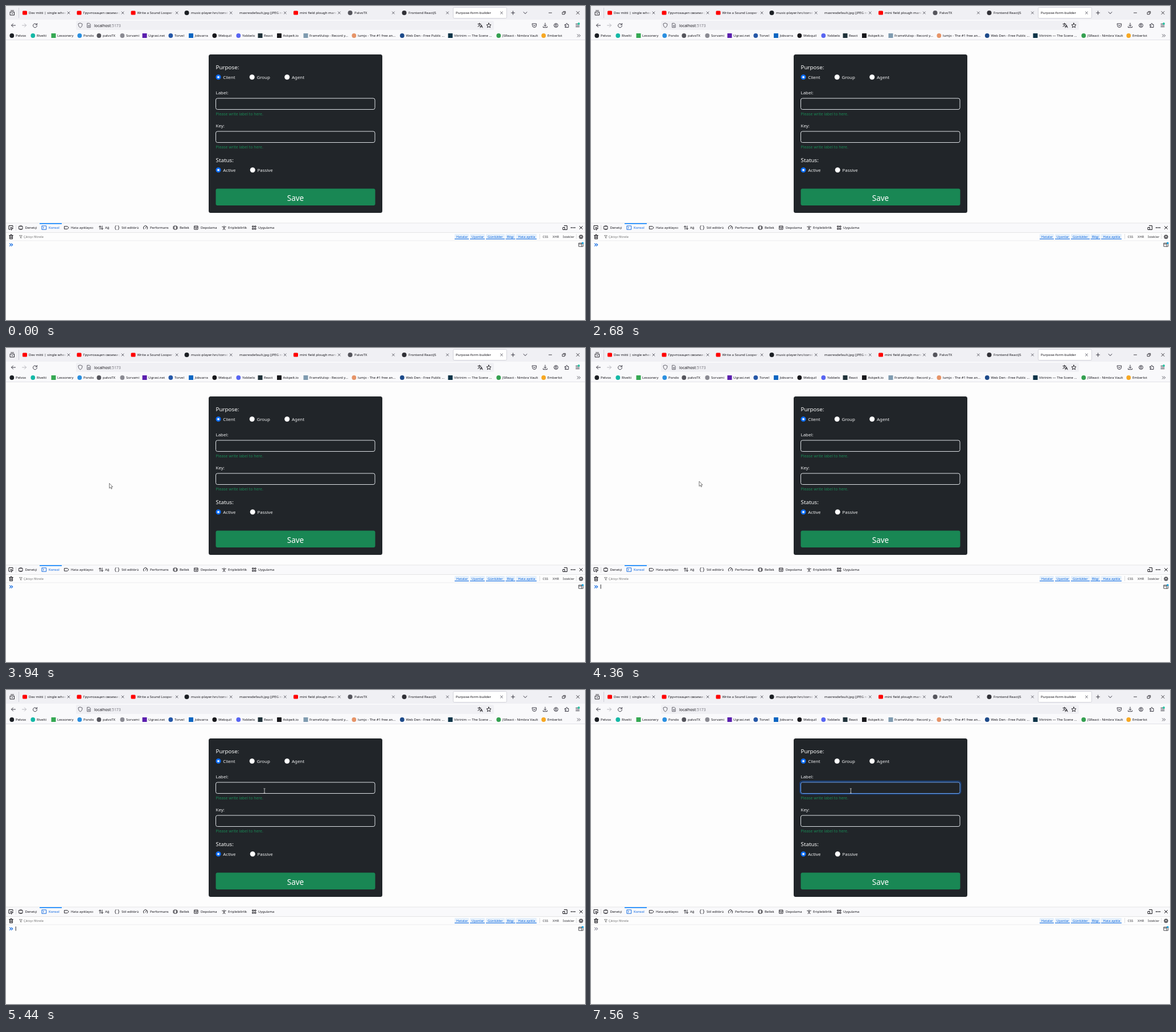
Animation, 1017 px wide and 551 px high, one loop 8 s. Source, as an HTML page:

```html
<!DOCTYPE html>
<html lang="en">
<head>
<meta charset="utf-8">
<title>Purpose-form-builder</title>
<style>
  html, body { margin: 0; width: 100%; height: 100%; overflow: hidden; background: #fdfdfd; }
  svg { display: block; width: 1017px; height: 551px; font-family: "Noto Sans", "Open Sans", sans-serif; }
  text { white-space: pre; }
</style>
</head>
<body>
<svg id="stage" viewBox="0 0 1017 551"></svg>
<script>
const INK = '#15141a', BLUE = '#0060df', CARD = '#212529';
const LOOP = 8000;

const text = (x, y, str, size = 6, fill = INK, extra = '') =>
  `<text x="${x}" y="${y}" font-size="${size}" fill="${fill}" ${extra}>${str}</text>`;
const rect = (x, y, w, h, fill, r = 0, extra = '') =>
  `<rect x="${x}" y="${y}" width="${w}" height="${h}" rx="${r}" fill="${fill}" ${extra}/>`;
const circle = (x, y, r, fill, extra = '') =>
  `<circle cx="${x}" cy="${y}" r="${r}" fill="${fill}" ${extra}/>`;
// Line icon, drawn around its centre
const icon = (x, y, d, color = '#3a3944', width = 1) =>
  `<path transform="translate(${x} ${y})" d="${d}" fill="none" stroke="${color}" stroke-width="${width}" stroke-linecap="round" stroke-linejoin="round"/>`;

const CROSS = 'M-2-2L2 2M2-2L-2 2';
const BOX = 'M-3-3H3V3H-3Z';
const RING = 'M-3.5 0A3.5 3.5 0 1 1 3.5 0A3.5 3.5 0 1 1-3.5 0';
const CHEVRONS = 'M-2.5-2.2L-.3 0L-2.5 2.2M.5-2.2L2.7 0L.5 2.2';

function tabBar() {
  const tabs = [
    [40, 'Dev mitti | single wheel p', '#f00'],
    [135.5, 'Грунтозацеп своими р', '#f00'],
    [230.5, 'Write a Sound Looper ap', '#f00'],
    [325, 'music-player/src/const', '#1b1f24'],
    [410, 'maxresdefault.jpg (JPEG re'],
    [516, 'mini field plough manuf', '#f00'],
    [612, 'PalvoTX', '#55555c'],
    [707, 'Frontend ReactJS', '#303036'],
    [790, 'Purpose-form-builder']
  ];
  let out = rect(0, 0, 1017, 24, '#f0f0f4') + rect(22, 3, 1, 18, '#cfcfd8');
  out += rect(785.5, 2.5, 94, 19, '#fff', 2, 'stroke="#c9c9d2" stroke-width=".8"');
  tabs.forEach(([x, label, mark], i) => {
    const close = 110 + i * 95.06, active = i === 8;
    if (mark) out += mark === '#f00' ? rect(x - 11, 8.5, 8, 7, mark, 1.5) : circle(x - 7.5, 12, 4, mark);
    out += text(x, 14.2, label, 6.1);
    if (!active) out += rect(close - 14, 5, 22, 14, 'url(#fade)');
    out += icon(close, 12, CROSS, '#45444e', .8);
  });
  return out
    + icon(11, 12, 'M-3.5-1.5H3.5V4H-3.5ZM-2.5-4H2.5M-1 1L0 2L1 1', INK, .9)
    + icon(890.5, 12, 'M-3 0H3M0-3V3') + icon(912, 12, 'M-3-1.3L0 1.5L3-1.3')
    + icon(956, 12, 'M-2.5 0H2.5', INK, .8) + icon(1004.5, 12, 'M-2.5-2.5L2.5 2.5M2.5-2.5L-2.5 2.5', INK, .8)
    + icon(980, 12, 'M-2.5-1H1.2V2.7H-2.5ZM-1-2.5H2.7V1', INK, .8);
}

function navBar() {
  return rect(0, 24, 1017, 35.5, '#f9f9fb') + rect(0, 59, 1017, 1, '#e2e2e8')
    + rect(123, 26, 734, 16, '#f0f0f4', 2)
    + icon(13, 34, 'M3.5 0H-3.5L-.5-3M-3.5 0L-.5 3')
    + icon(32, 34, 'M-3.5 0H3.5L.5-3M3.5 0L.5 3', '#b8b8be')
    + icon(51, 34, 'M3-1.5A3.5 3.5 0 1 0 3.5 .8M3.5-3.5V-1H1')
    + icon(130.5, 34, 'M0-4L3.5-2.5C3.5 1 2 3 0 4C-2 3-3.5 1-3.5-2.5Z', '#55545e', .9)
    + icon(145.5, 34, 'M-2.5-3.7H1L2.7-2V3.7H-2.5ZM-1 0H1.2M-1 1.7H1.2', '#55545e', .9)
    + `<text x="155" y="36.7" font-size="6.9" fill="${INK}">localhost<tspan fill="#77767f">:5173</tspan></text>`
    + icon(833, 34, 'M-4-2.5H1M-1.5-4V-2.5M.2-2.5C-.5 0-2 1.5-4 2M-3-1C-2 .5-1 1-.3 1.5M0 4L2 -1L4 4M.8 2.3H3.2', INK, .9)
    + icon(848, 34, 'M0-4L1.2-1.3L4-1L1.9 .9L2.5 3.8L0 2.3L-2.5 3.8L-1.9 .9L-4-1L-1.2-1.3Z', INK, .9)
    + icon(928, 34, 'M-3.5-3H3.5V0A3.5 3.5 0 0 1-3.5 0ZM-1.7-.7L0 1L1.7-.7')
    + icon(947, 34, 'M0-4V1.5M-2-.5L0 1.5L2-.5M-3.5 2V3.7H3.5V2')
    + icon(966, 34, RING + 'M-2 2.5C-1.5 .8 1.5 .8 2 2.5M-1-1A1 1 0 1 1 1-1A1 1 0 1 1-1-1')
    + icon(985, 34, 'M-3-1.5H-1C-1.5-4.5 1.5-4.5 1-1.5H3V3.5H-3V2C0 2 0 0-3 .3Z')
    + icon(1004, 34, 'M-3-2.5H3M-3 0H3M-3 2.5H3') + circle(1006, 31, 2, '#2ac3a2');
}

function bookmarks() {
  const items = [
    [17, 'Pelvox', '#1b1f24'], [54, 'Rivelti', '#14b8a6'], [90, 'Lessonery', '#35a853', 1],
    [136, 'Pondo', '#2a8fe0'], [170, 'palvoTX', '#55555c'], [211, 'Sorvami', '#8a8a92'],
    [250, 'Ugrasi.net', '#5b1fae', 1], [296, 'Torvel', '#2557a7'], [331.5, 'Jobvarra', '#0a66c2', 1],
    [373, 'Webquil', '#18181c'], [415, 'Yabbelo', '#5865f2'], [453, 'React', '#20323a', 1],
    [486.5, 'Askpelt.io', '#18181c', 1], [533, 'FrameVulop - Record y...', '#7f9bb0', 1],
    [618, 'lumjx - The #1 free an...', '#e69468'], [702.5, 'Web Den - Free Public ...', '#1d4a8a'],
    [787, 'Vitrinim — The Scene ...', '#0d3448', 1], [872, 'JSReact - Nimbra Vault', '#34a050'],
    [951, 'Emberlot', '#f7a823']
  ];
  return items.map(([x, label, color, square]) =>
    (square ? rect(x - 10.5, 48, 8, 8, color, .5) : circle(x - 6.7, 52, 3.9, color)) + text(x, 54.2, label)
  ).join('') + icon(1006, 52, CHEVRONS, '#45444e', .9);
}

function form() {
  const radio = (x, y, label, checked) =>
    circle(x, y, 4.5, checked ? '#0d6efd' : '#fff') + (checked ? circle(x, y, 1.9, '#fff') : '')
    + text(x + 8.3, y + 3.2, label, 7.9, '#f1f2f3');
  const field = (y, label, id) =>
    text(368.5, y - 7.2, label, 7.9, '#f1f2f3')
    + rect(368.5, y, 279.5, 19.5, CARD, 3, `id="${id}" stroke="#dee2e6"`)
    + text(368.5, y + 29.8, 'Please write label to here.', 6.9, '#198754');
  const heading = (y, label) => text(368.5, y, label, 9.8, '#fff', 'font-weight="500"');
  return rect(356, 85, 305, 278, CARD, 3.5)
    + heading(110.6, 'Purpose:')
    + radio(373, 124.8, 'Client', true) + radio(432.2, 124.8, 'Group') + radio(493.7, 124.8, 'Agent')
    + rect(367, 160, 282.5, 22.5, 'none', 4.5, 'id="glow" stroke="#0d6efd" stroke-opacity=".35" stroke-width="2.2"')
    + field(162, 'Label:', 'labelField') + field(220, 'Key:', 'keyField')
    + heading(274, 'Status:')
    + radio(373, 287.8, 'Active', true) + radio(433.2, 287.8, 'Passive')
    + rect(368.5, 320.5, 280, 29.5, '#198754', 3, 'id="save"')
    + text(508.5, 341.6, 'Save', 13.5, '#fff', 'text-anchor="middle"')
    + rect(375.5, 166, 1, 11.5, '#fff', 0, 'id="fieldCaret"');
}

function devTools() {
  const panels = [
    [26, 33.5, 'Denetçi', 'M-3-2.5H3V2.5H-3ZM-1-3.7V-2.5M1-3.7V-2.5M-1 2.5V3.7M1 2.5V3.7'],
    [67, 75, 'Konsol', 'M-3.7-3.2H3.7V3.2H-3.7ZM-2-1.5L-.5 0L-2 1.5'],
    [106.5, 114, 'Hata ayıklayıcı', 'M-3.7-2.3H1.5L3.7 0L1.5 2.3H-3.7Z'],
    [167, 174, 'Ağ', 'M-1.8 3V-3M-3.5-1.3L-1.8-3L-.1-1.3M1.8-3V3M.1 1.3L1.8 3L3.5 1.3'],
    [195, 203, 'Stil editörü', 'M-1.5-3.5C-4-3.5-2-.3-3.7 0C-2 .3-4 3.5-1.5 3.5M1.5-3.5C4-3.5 2-.3 3.7 0C2 .3 4 3.5 1.5 3.5'],
    [245, 253, 'Performans', 'M-3 2.5A3.7 3.7 0 1 1 3 2.5M0 1L1.7-1.5'],
    [297.5, 305, 'Bellek', 'M-2-3H2V3H-2ZM-3.5-2V2M3.5-2V2'],
    [334, 342, 'Depolama', BOX + 'M-3-.8H3M-1 1.2H1'],
    [383, 390, 'Erişilebilirlik', 'M-3.3-1.6L0-1L3.3-1.6M0-1V1L-1.8 3.7M0 1L1.8 3.7M0-3.3V-3'],
    [436, 443, 'Uygulama', 'M-3-3H-1V-1H-3ZM1-3H3V-1H1ZM-3 1H-1V3H-3ZM1 1H3V3H1Z']
  ];
  const filters = [
    [791, 'Hatalar', 788, 25], [818, 'Uyarılar', 815, 26], [846, 'Günlükler', 843, 33],
    [880, 'Bilgi', 877.5, 17], [899.5, 'Hata ayıkla', 896, 36]
  ];
  let out = rect(0, 381, 1017, 16, '#f9f9fb') + rect(0, 380.5, 1017, .8, '#e0e0e2')
    + rect(0, 397, 1017, .8, '#e0e0e2') + rect(0, 411.5, 1017, .8, '#e8e8ea')
    + rect(59, 381, 39, 1.6, '#0a84ff') + rect(17, 384, .8, 10, '#d7d7db');
  panels.forEach(([iconX, x, label, d], i) => {
    const color = i === 1 ? BLUE : INK;
    out += icon(iconX, 389, d, color, .9) + text(x, 391.2, label, 5.9, color);
  });
  filters.forEach(([x, label, left, width]) => {
    out += rect(left, 400, width, 9, '#e5f0fb', 1) + rect(left, 408.4, width, 1, BLUE)
      + text(x, 406.5, label, 5.8, BLUE);
  });
  [[942.5, 'CSS'], [960, 'XHR'], [978, 'İstekler']].forEach(([x, label]) => out += text(x, 406.5, label, 5.8, '#38383d'));
  return out + rect(937, 400, .8, 9, '#d7d7db') + rect(1001.5, 400, .8, 9, '#d7d7db')
    + icon(8.5, 389, 'M-1 3H-3.5V-3.5H3.5V-1M0-.5L4 1.2L2 2L1.2 4Z', INK)
    + icon(982, 389, 'M-1.5-3.5H3.5V3.5H0M-3.5-.5H-.5V3.5H-3.5Z', INK)
    + [-3, 0, 3].map(dx => circle(996 + dx, 389, 1, INK)).join('')
    + icon(1010, 389, 'M-2.5-2.5L2.5 2.5M2.5-2.5L-2.5 2.5', INK)
    + icon(9, 405, 'M-3.3-2.5H3.3M-1-2.5V-3.7H1V-2.5M-2.5-2.5V3.7H2.5V-2.5M-.8-.7V2M.8-.7V2', INK)
    + icon(26, 405, 'M-2.3-2.3H2.3L.6 0V2.5L-.6 1.7V0Z', '#737373', .8)
    + text(31, 406.6, 'Çıktıyı filtrele', 5.75, '#737373')
    + icon(1010, 405, 'M-2 0A2 2 0 1 1 2 0A2 2 0 1 1-2 0M0-3.7V-2.5M0 2.5V3.7M-3.7 0H-2.5M2.5 0H3.7M-2.6-2.6L-1.8-1.8M1.8 1.8L2.6 2.6M2.6-2.6L1.8-1.8M-1.8 1.8L-2.6 2.6', INK, 1.1)
    + icon(1010, 419, 'M-3.7-3H3.7V3H-3.7ZM1-3V3M-3.7-1.2H1', '#38383d', .9) + circle(1013, 416, 1.7, '#0a9fdd')
    + `<g id="prompt">${icon(9, 419, CHEVRONS, 'currentColor', 1.1)}</g>`
    + rect(16.7, 415, .9, 7.5, INK, 0, 'id="consoleCaret"');
}

const cursors = `<g id="cursor">
  <path id="arrow" d="M0 0V8.6L2 6.8L3.4 9.8L4.7 9.2L3.4 6.2H6Z" fill="#fff" stroke="#222" stroke-width=".6"/>
  <path id="beam" d="M-1.5-4H-.3L0-3.7L.3-4H1.5M0-3.7V3.7M-1.5 4H-.3L0 3.7L.3 4H1.5" fill="none" stroke="#e8e8e8" stroke-width=".8"/>
  <path id="hand" d="M-.8 5V.6Q0-.6 .8 .6V3.5L4.5 4.5V7L3.5 10H-.8L-3 6.5Q-2.8 5-.8 6.5Z" fill="#fff" stroke="#222" stroke-width=".6"/>
</g>`;

document.getElementById('stage').innerHTML = `<defs><linearGradient id="fade">
    <stop offset="0" stop-color="#f0f0f4" stop-opacity="0"/><stop offset=".45" stop-color="#f0f0f4"/>
  </linearGradient></defs>` + tabBar() + navBar() + bookmarks() + form() + devTools() + cursors;

// Pointer samples: time, x, y. The pointer holds still between them.
const pointerPath = [
  [3240, 500, 338], [3380, 440, 326], [3460, 382, 322], [3520, 329, 290.5], [3640, 277, 268],
  [3720, 231, 252], [3800, 195, 241], [3940, 181.5, 237.5],
  [4360, 190, 234], [4480, 218, 223], [4580, 259, 210], [4680, 304, 198], [4780, 343, 188],
  [4880, 370.3, 181], [4920, 385, 178.5],
  [5060, 410, 176], [5160, 430, 175.5], [5260, 443, 176], [5360, 450, 176.5], [5440, 454, 177], [5620, 456.3, 177]
];
const consoleCaretOn = [[1520, 2680], [4180, 5620]];
const focusTime = 6140, caretOffTime = 7560;

const el = id => document.getElementById(id);
const show = (id, on) => el(id).setAttribute('visibility', on ? 'visible' : 'hidden');
const fill = (id, name, value) => el(id).setAttribute(name, value);

function draw(t) {
  const pointer = pointerPath.filter(p => p[0] <= t).pop();
  const [, x, y] = pointer || [0, -50, -50];
  const overSave = t >= 3240 && t < 3520;
  const overField = x > 368 && x < 648 && y > 162 && y < 181;
  el('cursor').setAttribute('transform', `translate(${x} ${y})`);
  show('arrow', pointer && !overSave && !overField);
  show('hand', overSave);
  show('beam', overField);

  fill('save', 'fill', t >= 3240 && t < 3640 ? '#157347' : '#198754');
  const focused = t >= focusTime;
  show('glow', focused);
  fill('labelField', 'stroke', focused ? '#6fa8fb' : '#dee2e6');
  show('fieldCaret', focused && t < caretOffTime);
  fill('prompt', 'color', focused ? '#8f8f9d' : BLUE);
  show('consoleCaret', consoleCaretOn.some(([from, to]) => t >= from && t < to));
}

const start = performance.now();
function tick() {
  draw((performance.now() - start) % LOOP);
  requestAnimationFrame(tick);
}
tick();
</script>
</body>
</html>
```
